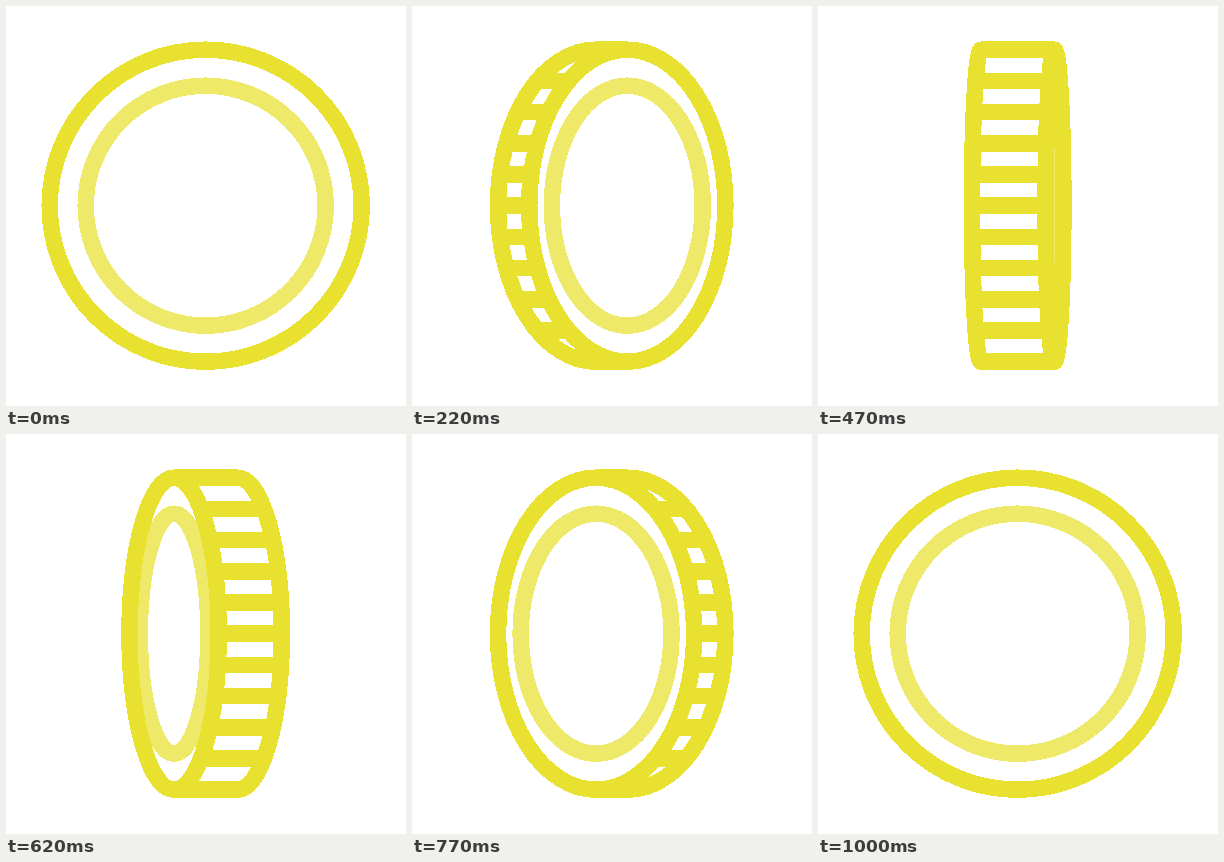
An HTML page that plays this animation: 400 px wide and 400 px high, repeating every 1020 ms.

```html
<!DOCTYPE html>
<html lang="en">
<head>
<meta charset="utf-8">
<title>Spinning coin</title>
<style>
  html, body { margin: 0; width: 100%; height: 100%; overflow: hidden; background: #fff; }
  svg { display: block; width: 100vw; height: 100vh; }
  path { fill: none; stroke-width: 16.5; stroke-linejoin: round; }
</style>
</head>
<body>
<svg viewBox="0 0 400 400" shape-rendering="crispEdges">
  <g transform="translate(199.7 199.7)">
    <g id="coin">
      <path id="inner" stroke="#eee968"/>
      <path id="edge" stroke="#e8e130"/>
      <path id="rim" stroke="#e8e130"/>
    </g>
  </g>
</svg>
<script>
const LOOP = 1020;
const HALF_STEPS = 20;
const RIM = 156;
const INNER = 120;
const HALF_THICKNESS = 37;
const RIDGES = 10;
const RAMP = 0.25;

const [coin, inner, edge, rim] = ['coin', 'inner', 'edge', 'rim'].map(id => document.getElementById(id));

// Steps of 25 ms, each starting on a whole 10 ms tick.
const stepAt = ms => Math.ceil((Math.floor(ms / 10) + 1) / 2.5) - 1;

// Speeds up during the ramp, then moves at constant speed.
function turn(p) {
  const speed = 1 / (1 - RAMP / 2);
  return p < RAMP ? speed * p * p / (2 * RAMP) : speed * (p - RAMP / 2);
}

const easeSine = p => (1 - Math.cos(Math.PI * p)) / 2;

// Arcs keep drawing as a straight line when rx reaches zero, unlike <ellipse>.
const ellipse = (cx, rx, ry) =>
  `M${cx} ${-ry}A${rx} ${ry} 0 0 1 ${cx} ${ry}A${rx} ${ry} 0 0 1 ${cx} ${-ry}Z`;

function edgePath(shift, rx) {
  let d = `M${-shift} ${RIM}A${rx} ${RIM} 0 0 1 ${-shift} ${-RIM}`;
  for (let i = 0; i <= RIDGES; i++) {
    const v = 2 * i / RIDGES - 1;
    const bulge = rx * Math.sqrt(1 - v * v);
    d += `M${-shift - bulge} ${v * RIM}H${shift - bulge}`;
  }
  return d;
}

function draw(ms) {
  const step = stepAt(ms);
  const p = 1 - Math.abs(step / HALF_STEPS - 1);
  const width = Math.max(0, 1 - turn(p));
  const shift = HALF_THICKNESS * easeSine(p);

  coin.setAttribute('transform', `scale(${step > HALF_STEPS ? -1 : 1} 1)`);
  inner.setAttribute('d', ellipse(shift, INNER * width, INNER));
  edge.setAttribute('d', edgePath(shift, RIM * width));
  rim.setAttribute('d', ellipse(shift, RIM * width, RIM));
}

const start = performance.now();
function tick() {
  draw((performance.now() - start) % LOOP);
  requestAnimationFrame(tick);
}
tick();
</script>
</body>
</html>
```
